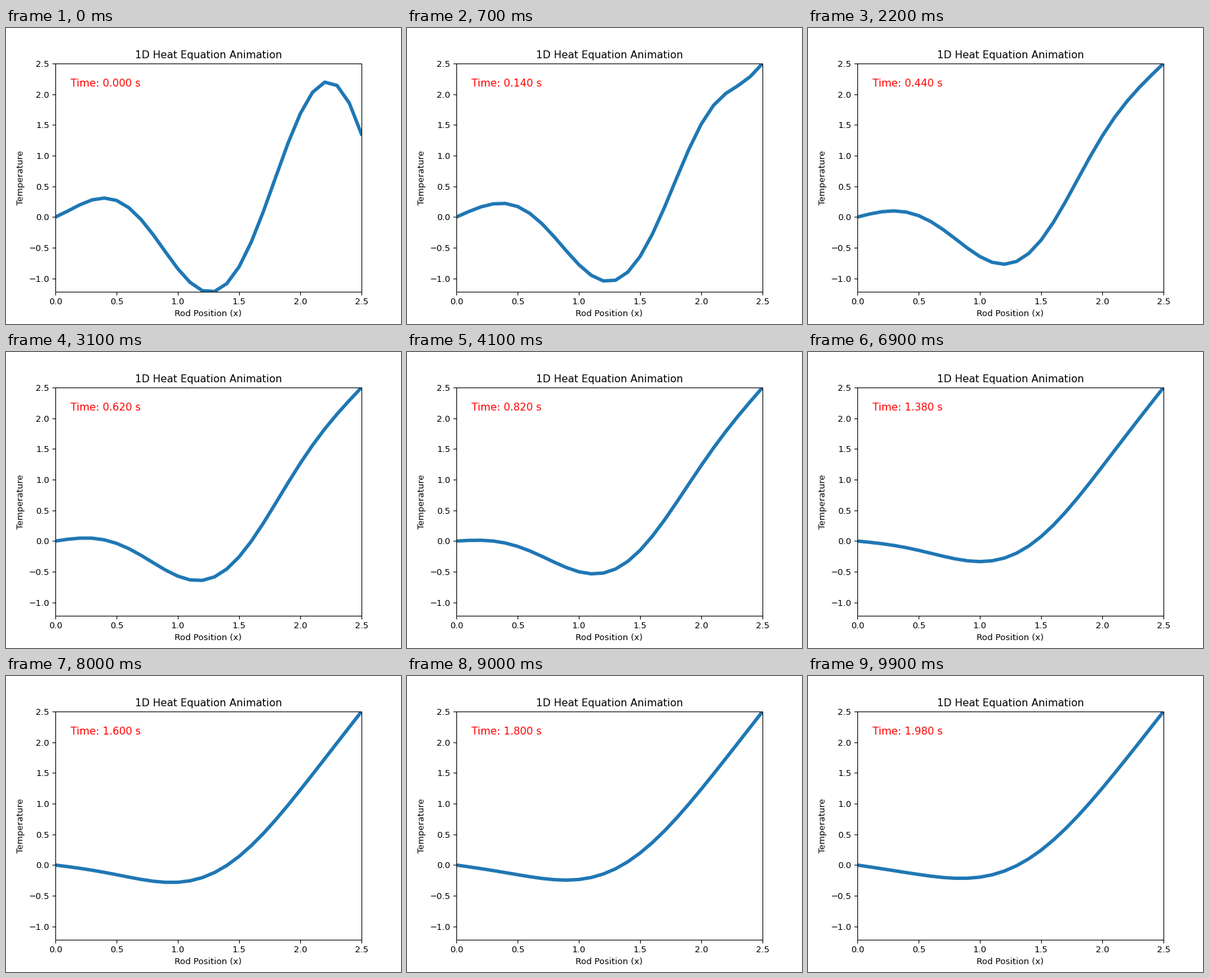
A matplotlib script for the animation above (10 s loop, 600 by 450 pixels).

```python
import numpy as np
import matplotlib.pyplot as plt
from matplotlib.animation import FuncAnimation

LENGTH, DX = 2.5, 0.1
DIFFUSIVITY = 0.1
FRAMES, FRAME_DT, SUBSTEPS = 100, 0.02, 20
LEFT_TEMP, RIGHT_TEMP = 0.0, 2.5

x = np.linspace(0, LENGTH, round(LENGTH / DX) + 1)


def solve():
    """Explicit finite differences; the end temperatures apply once time starts."""
    r = DIFFUSIVITY * FRAME_DT / SUBSTEPS / DX**2
    u = x * np.sin(np.pi * x + 1)
    history = [u.copy()]
    u[0], u[-1] = LEFT_TEMP, RIGHT_TEMP
    for _ in range(FRAMES - 1):
        for _ in range(SUBSTEPS):
            u[1:-1] += r * (u[2:] - 2 * u[1:-1] + u[:-2])
        history.append(u.copy())
    return history


history = solve()

fig, ax = plt.subplots(figsize=(6.4, 4.8), dpi=93.75)
ax.set_xlim(0, LENGTH)
ax.set_ylim(history[0].min(), RIGHT_TEMP)
ax.set_xlabel("Rod Position (x)")
ax.set_ylabel("Temperature")
ax.set_title("1D Heat Equation Animation")
line, = ax.plot(x, history[0], lw=4)
clock = ax.text(0.05, 0.9, "", transform=ax.transAxes, fontsize=12, color="red")


def update(i):
    line.set_ydata(history[i])
    clock.set_text(f"Time: {i * FRAME_DT:.3f} s")
    return line, clock


anim = FuncAnimation(fig, update, frames=FRAMES, interval=100, repeat=True)
plt.show()
```
